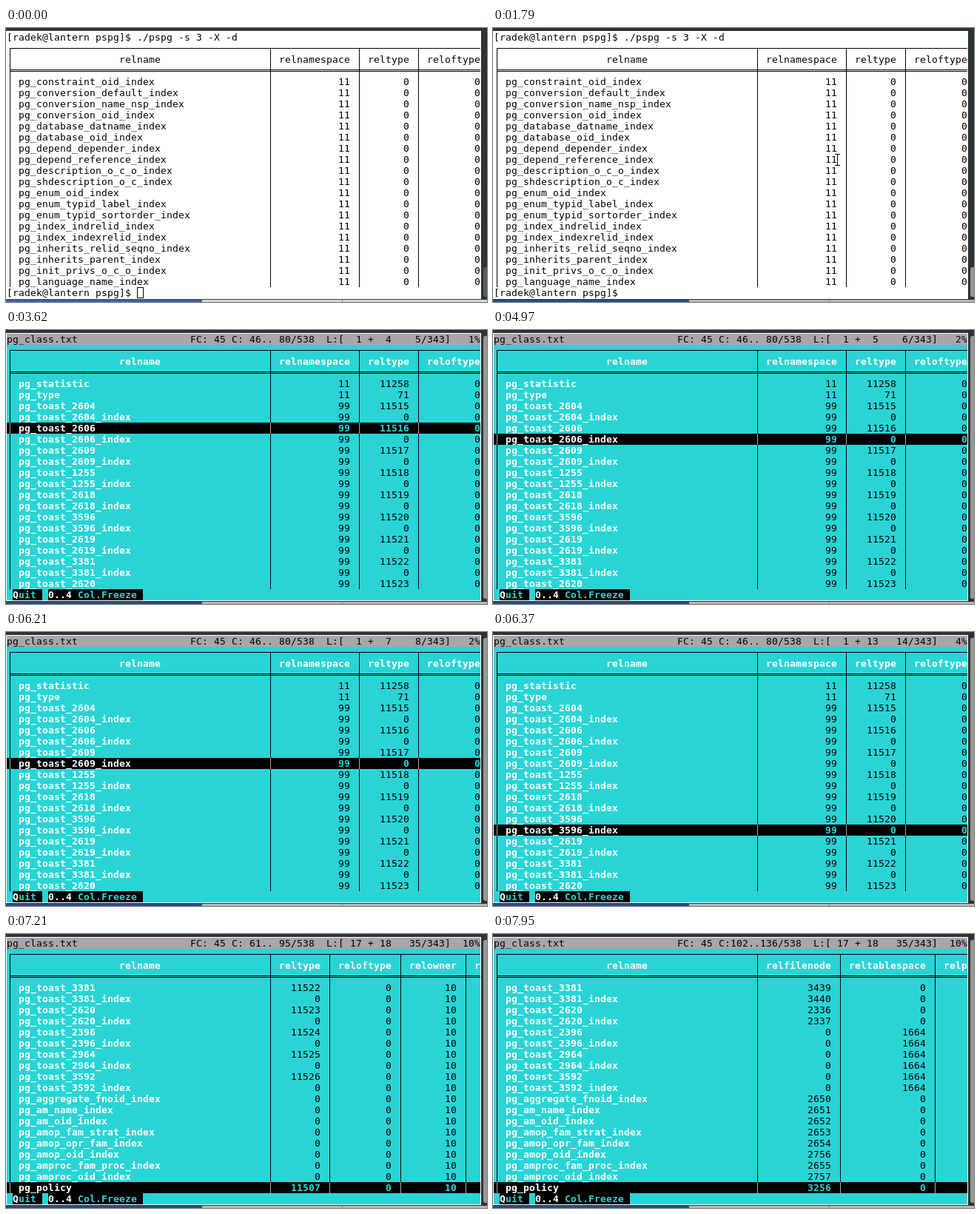
These frames come from a looping animation (650 px wide and 370 px high, 8000 ms). An HTML page with a canvas:

```html
<!DOCTYPE html>
<html lang="en">
<head>
<meta charset="utf-8">
<title>Terminal pager</title>
<style>
html, body { margin: 0; width: 650px; height: 370px; overflow: hidden; background: #fff; }
canvas { display: block; }
</style>
</head>
<body>
<canvas id="stage" width="650" height="370"></canvas>
<script>
const g = document.getElementById('stage').getContext('2d');
const LOOP = 8000, CW = 8, RH = 15, VISIBLE = 19, TOTAL = 343, WIDTH = 538;
const WHITE = '#fff', BLACK = '#000', CYAN = '#2ad4d5', GREY = '#aaa5aa';
const PROMPT = '[radek@lantern pspg]$ ', COMMAND = './pspg -s 3 -X -d';

// Column: first character, name, inner width
const COLUMNS = [
  [45, 'relnamespace', 12], [60, 'reltype', 7], [70, 'reloftype', 9],
  [82, 'relowner', 8], [93, 'relam', 5], [101, 'relfilenode', 11],
  [115, 'reltablespace', 13], [131, 'relpages', 8],
  [497, 'reloptions', 23], [523, 'relpartbound', 12]
];

const index = s => s.split(' ').map(n => `pg_${n}_index`);
const PRINTED = index('constraint_oid conversion_default conversion_name_nsp conversion_oid ' +
  'database_datname database_oid depend_depender depend_reference description_o_c_o ' +
  'shdescription_o_c enum_oid enum_typid_label enum_typid_sortorder index_indrelid ' +
  'index_indexrelid inherits_relid_seqno inherits_parent init_privs_o_c_o language_name');
const TOAST = [2604, 2606, 2609, 1255, 2618, 3596, 2619, 3381, 2620, 2396, 2964, 3592];
const NAMES = ['pg_statistic', 'pg_type',
  ...TOAST.flatMap(n => ['pg_toast_' + n, `pg_toast_${n}_index`]),
  ...index('aggregate_fnoid am_name am_oid amop_fam_strat amop_opr_fam amop_oid amproc_fam_proc amproc_oid'),
  'pg_policy'];
const FILES = [3439, 3440, 2336, 2337, 0, 0, 0, 0, 0, 0,
  2650, 2651, 2652, 2653, 2654, 2756, 2655, 2757, 3256];

function pagerValue(i, name) {
  const toast = i > 1 && i < 26;
  switch (name) {
    case 'relnamespace': return toast ? 99 : 11;
    case 'reltype':
      if (toast) return i % 2 ? 0 : 11514 + i / 2;
      return { 0: 11258, 1: 71, 34: 11507 }[i] || 0;
    case 'reloftype': return 0;
    case 'relowner': return 10;
    case 'relam': return NAMES[i].endsWith('_index') ? 403 : 0;
    case 'relfilenode': return FILES[i - 16] ?? 0;
    case 'reltablespace': return i > 19 && i < 26 ? 1664 : 0;
    case 'relpages': return 1;
  }
  return '';
}

const X = c => 1 + c * CW, Y = r => 5 + r * RH;
const last = (steps, t) => steps.reduce((v, [at, next]) => t >= at ? next : v, steps[0][1]);

function box(x, y, w, h, color) {
  g.fillStyle = color;
  g.fillRect(x, y, w, h);
}

function text(s, col, row, color, bold) {
  g.font = `${bold ? 'bold ' : ''}13px "DejaVu Sans Mono", monospace`;
  g.letterSpacing = '0px';
  g.letterSpacing = CW - g.measureText('0').width + 'px';
  g.fillStyle = color;
  g.fillText(s, X(col), Y(row) + 12);
}

function clip(x, y, w, h, draw) {
  g.save();
  g.beginPath();
  g.rect(x, y, w, h);
  g.clip();
  draw();
  g.restore();
}

// A frozen name column, then the columns from character `offset` on
function table(names, first, value, offset, pager, active) {
  const head = pager ? WHITE : BLACK;
  const shift = 45 - offset;
  const end = Math.min(641, X(WIDTH - 1 + shift) + 5);
  const vertical = c => {
    const x = X(c) + 4;
    box(x, 27, 1, 323, BLACK);
    if (active >= 0) box(x, Y(4 + active), 1, RH, '#aaa');
  };
  for (const y of [27, 56, 58]) box(5, y, end - 5, 1, BLACK);
  if (active >= 0) box(1, Y(4 + active), 640, RH, BLACK);
  vertical(0);
  vertical(44);
  text('relname', 19, 2, head, pager);
  for (let r = 0; r < VISIBLE; r++) text(names[first + r], 2, 4 + r, head, pager);

  clip(X(45), 5, 641 - X(45), 345, () => {
    for (const [start, name, width] of COLUMNS) {
      const c = start + shift;
      if (c + width + 2 < 45 || c > 80) continue;
      vertical(c + width + 2);
      text(name, c + 1 + Math.floor((width - name.length) / 2), 2, head, pager);
      for (let r = 0; r < VISIBLE; r++) {
        const s = String(value(first + r, name));
        const on = r === active;
        text(s, c + 1 + width - s.length, 4 + r, on ? CYAN : BLACK, on);
      }
    }
  });
}

function shell(t) {
  text(PROMPT + COMMAND, 0, 0, BLACK);
  table(PRINTED, 0, (i, name) => name === 'relnamespace' ? 11 : 0, 45, false, -1);
  text(PROMPT + (t >= 1940 ? COMMAND : ''), 0, 23, BLACK);
  if (t < 1200) {
    g.strokeStyle = BLACK;
    g.lineWidth = 1;
    g.strokeRect(177.5, 350.5, 8, 14);
  } else if (t < 1790) {
    box(177, 350, CW, RH, BLACK);
  } else if (t >= 1980) {
    box(X(PROMPT.length + COMMAND.length), 350, CW, RH, BLACK);
  }
}

function cursorRow(t) {
  if (t >= 6210) {
    const step = Math.min(19, Math.floor((t - 6210) / 40));
    return Math.floor((37 + 7 * step) / 5);
  }
  return last([[0, 0], [3120, 1], [3280, 2], [3450, 3], [3620, 4], [3760, 5], [5710, 6]], t);
}

function pager(t) {
  const row = cursorRow(t);
  const first = Math.max(0, row - VISIBLE + 1);
  const offset = last([[0, 45], [4390, 503], [4970, 45], [7210, 60], [7710, 70], [7750, 93], [7950, 101]], t);
  const pad = (n, w) => String(n).padStart(w);

  box(1, 5, 640, 360, CYAN);
  box(1, 5, 640, RH, GREY);
  text('pg_class.txt', 0, 0, BLACK);
  text(`FC: 45 C:${pad(offset + 1, 3)}..${pad(offset + 35, 3)}/${WIDTH}  ` +
    `L:[${pad(first + 1, 3)} + ${pad(row - first, 2)}${pad(row + 1, 5)}/${TOTAL}]` +
    `${pad(Math.round((row + 1) / TOTAL * 100), 4)}%`, 31, 0, BLACK);
  table(NAMES, first, pagerValue, offset, true, row - first);

  box(X(1), 350, 5 * CW, RH, BLACK);
  box(X(7), 350, 16 * CW, RH, BLACK);
  text('Q', 1, 23, WHITE, true);
  text('uit', 2, 23, CYAN, true);
  text('0..4', 7, 23, WHITE, true);
  text('Col.Freeze', 12, 23, CYAN, true);
}

function desktop(t) {
  const focus = last([[0, 0], [1200, 0.5], [1240, 1]], t);
  const mix = (a, b) => `rgb(${a.map((v, i) => Math.round(v + (b[i] - v) * focus))})`;
  box(0, 0, 650, 370, WHITE);
  box(0, 0, 650, 3, '#2e3339');
  box(0, 3, 650, 1, mix([70, 74, 78], [44, 48, 52]));
  box(642, 3, 8, 364, '#2b3335');
  const top = t < 2480 ? 323 : 8;
  g.fillStyle = mix([88, 93, 95], [150, 152, 152]);
  g.beginPath();
  g.roundRect(645, top, 8, 363 - top, 3);
  g.fill();
  box(0, 366, 650, 1, mix([60, 64, 68], [44, 48, 52]));
  box(0, 367, 265, 3, mix([58, 98, 165], [42, 76, 130]));
  box(265, 367, 385, 3, mix([217, 217, 217], [182, 182, 182]));
  box(454, 367, 1, 3, '#888');
}

function shape(points, x, y) {
  g.beginPath();
  points.forEach(([px, py]) => g.lineTo(x + px, y + py));
  g.closePath();
  g.strokeStyle = WHITE;
  g.lineWidth = 1.5;
  g.stroke();
  g.fillStyle = BLACK;
  g.fill();
}

function pointer(t) {
  if (t >= 750 && t < 1900) {
    const p = Math.min(5, Math.floor((t - 750) / 52)) / 5;
    const far = (1 - p) ** 1.5;
    const x = Math.round(465 + 115 * far), y = Math.round(178 + 40 * far);
    for (const [grow, color] of [[1, WHITE], [0, BLACK]]) {
      for (const [bx, by, w, h] of [[-3, -8, 7, 1], [0, -8, 1, 16], [-3, 7, 7, 1]]) {
        box(x + bx - grow, y + by - grow, w + 2 * grow, h + 2 * grow, color);
      }
    }
  } else if (t >= 2520 && t < 3080) {
    shape([[0, 0], [0, 15], [3.5, 11.5], [6, 17], [8.5, 16], [6, 10.5], [11, 10.5]], 465, 178);
  }
}

function frame(now) {
  const t = now % LOOP;
  desktop(t);
  (t < 2480 ? shell : pager)(t);
  pointer(t);
  requestAnimationFrame(frame);
}
requestAnimationFrame(frame);
</script>
</body>
</html>
```
